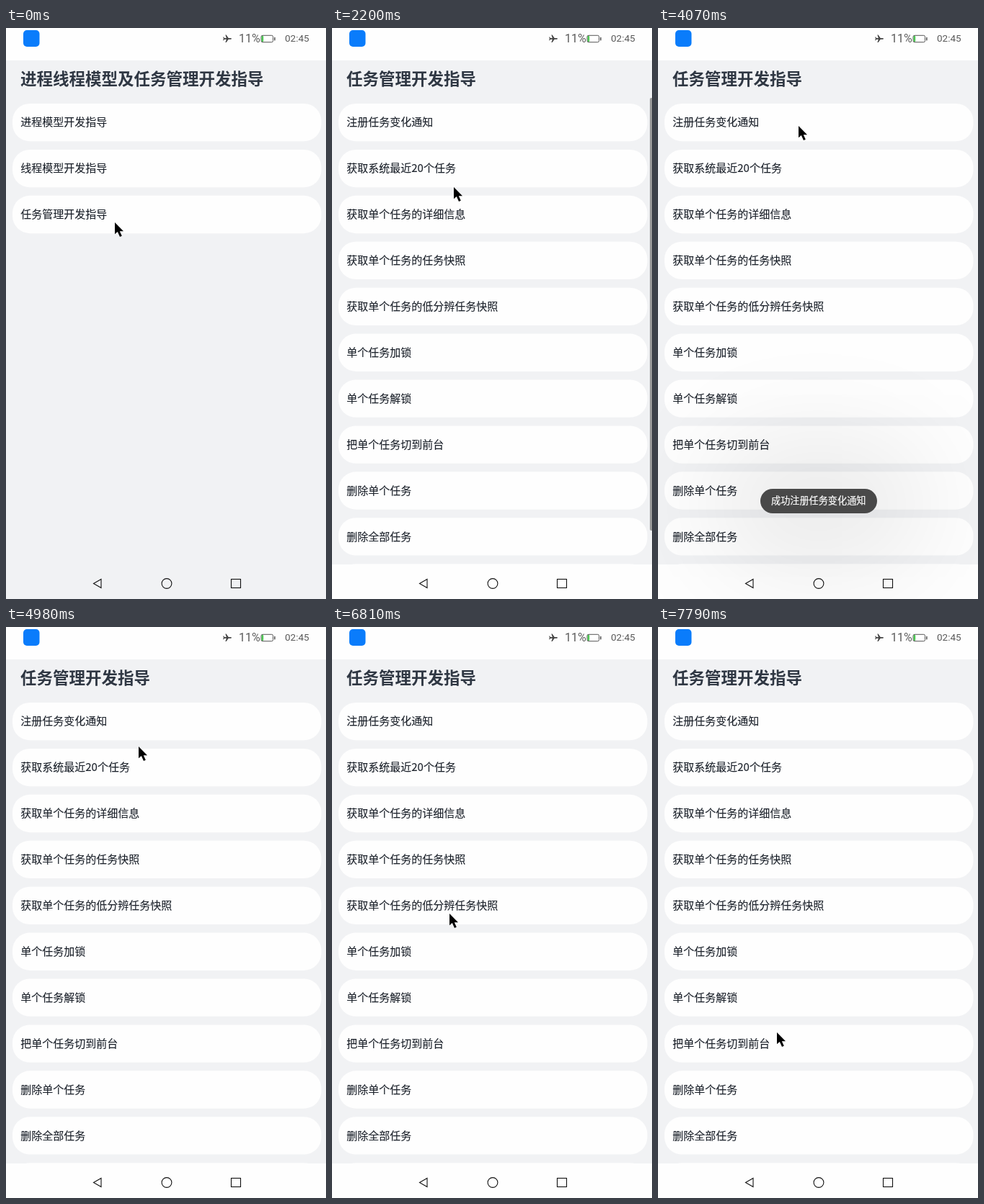
These frames come from a looping animation (444x793 px, 8 s). An HTML page:

```html
<!DOCTYPE html>
<html lang="zh-CN">
<head>
<meta charset="utf-8">
<title>任务管理</title>
<style>
  html, body { margin: 0; width: 100%; height: 100%; overflow: hidden; background: #f1f2f4; }
  svg { display: block; width: 444px; height: 793px; }
  text { font-family: "Noto Sans CJK SC", "Noto Sans CJK", sans-serif; white-space: pre; }
  .title { font-size: 22.5px; font-weight: 700; fill: #2f3743; }
  .label { font-size: 15px; fill: #1c222b; stroke: #1c222b; stroke-width: .12px; }
  .status { font-family: Roboto, sans-serif; fill: #5a5a5a; }
  .nav { fill: none; stroke: #111; stroke-width: 1.1; }
  #toast { position: absolute; left: 142px; top: 640px; width: 162px; height: 34px;
    border-radius: 17px; background: #494949; box-shadow: 0 4px 160px 60px rgba(0, 0, 0, .1); }
  #toast svg { width: 162px; height: 34px; }
  #toast text { font-size: 13.15px; fill: #fff; stroke: #fff; stroke-width: .2px; }
  #stage { position: relative; width: 444px; height: 793px; overflow: hidden; }
  #pointer { position: absolute; left: 0; top: 0; width: 14px; height: 22px; }
</style>
</head>
<body>
<div id="stage">
  <svg viewBox="0 0 444 793">
    <rect width="444" height="793" fill="#f1f2f4"/>
    <g id="home"></g>
    <g id="tasks">
      <g id="taskRows"></g>
      <rect y="745" width="444" height="48" fill="#fefefe"/>
    </g>
    <rect id="scrollbar" x="441" y="97" width="4" height="601" rx="2" fill="#999"/>

    <rect width="444" height="45" fill="#fefefe"/>
    <rect x="24" y="3" width="22.5" height="23" rx="5" fill="#0a7cfb"/>
    <path d="M313 14.8Q313 13.9 311.5 13.9H308.7L305.6 9.5H304.4L305.8 13.9H303.2L302 12.4H301.2L301.9 14.8L301.2 17.2H302L303.2 15.7H305.8L304.4 20.1H305.6L308.7 15.7H311.5Q313 15.7 313 14.8Z" fill="#444"/>
    <text class="status" x="323" y="20" font-size="16">11%</text>
    <rect x="354" y="10.3" width="16.5" height="9.4" rx="2" fill="#fff" stroke="#555"/>
    <rect x="354.6" y="11" width="2.6" height="8" rx="1" fill="#4cc552"/>
    <rect x="372" y="12.8" width="1.6" height="4.6" rx=".7" fill="#555"/>
    <text class="status" x="387" y="19.3" font-size="13.5">02:45</text>

    <g class="nav">
      <path d="M121.5 771.5L132 765.5V777.5Z"/>
      <circle cx="223" cy="771.5" r="6.9"/>
      <rect x="312.5" y="765.5" width="13" height="12"/>
    </g>
  </svg>
  <div id="toast"><svg viewBox="0 0 162 34"><text x="15" y="21.3">成功注册任务变化通知</text></svg></div>
  <svg id="pointer" viewBox="0 0 14 22"><path d="M0 0V16.2L3.8 12.9L7 20L9.8 18.8L6.8 12.2H12Z"/></svg>
</div>
<script>
const LOOP = 8000;
const $ = id => document.getElementById(id);

function page(title, labels) {
  const rows = labels.map((label, i) => {
    const y = 105 + 63.92 * i;
    return `<rect x="9" y="${y}" width="428.5" height="52.3" rx="24" fill="#fefefe"/>
      <text class="label" x="20.3" y="${y + 31.3}">${label}</text>`;
  });
  return `<text class="title" x="20" y="79.3">${title}</text>${rows.join('')}`;
}

$('home').innerHTML = page('进程线程模型及任务管理开发指导',
  ['进程模型开发指导', '线程模型开发指导', '任务管理开发指导']);
$('taskRows').innerHTML = page('任务管理开发指导', [
  '注册任务变化通知', '获取系统最近20个任务', '获取单个任务的详细信息',
  '获取单个任务的任务快照', '获取单个任务的低分辨任务快照', '单个任务加锁',
  '单个任务解锁', '把单个任务切到前台', '删除单个任务', '删除全部任务', '']);

// Each step is [time, value]; a value holds until the next step.
function play(id, property, steps) {
  const frames = steps.map(([time, value]) =>
    ({ offset: time / LOOP, [property]: value, easing: 'steps(1, end)' }));
  frames.push({ ...frames[frames.length - 1], offset: 1 });
  $(id).animate(frames, { duration: LOOP, iterations: Infinity });
}

const show = (id, from, to) => play(id, 'visibility', [
  ...(from > 0 ? [[0, 'hidden']] : []),
  [from, 'visible'],
  ...(to < LOOP ? [[to, 'hidden']] : [])
]);

show('home', 0, 890);
show('tasks', 890, LOOP);
show('scrollbar', 890, 2480);
show('toast', 4070, 4980);

const pointerPath = [
  [0, 151, 270], [2200, 169, 221], [2480, 179, 185], [2750, 191, 153],
  [3040, 195, 136], [4980, 184, 166], [5410, 190, 214], [5690, 169, 246],
  [6230, 172, 320], [6380, 163, 357], [6810, 163, 398], [7090, 163, 410],
  [7370, 159, 457], [7510, 157, 514], [7790, 165, 563]
];
play('pointer', 'transform',
  pointerPath.map(([time, x, y]) => [time, `translate(${x}px, ${y}px)`]));
</script>
</body>
</html>
```
